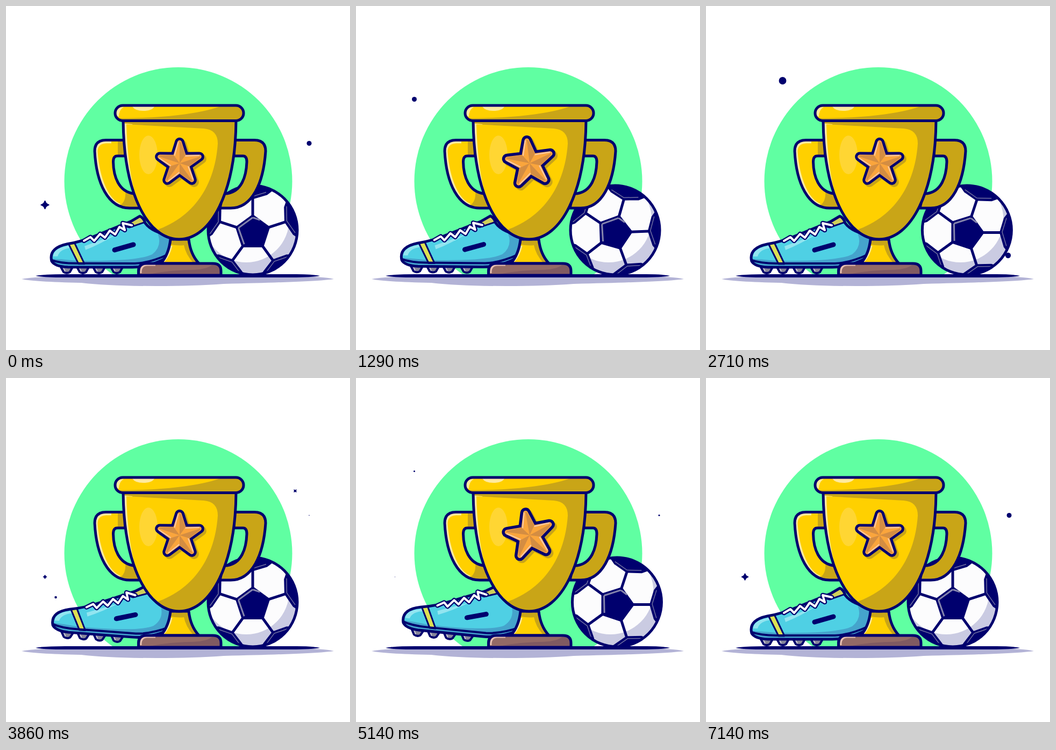
An HTML page that plays this animation: 640x640 px, repeating every 7.21 s.

```html
<!DOCTYPE html>
<html lang="en">
<head>
<meta charset="utf-8">
<title>Football trophy</title>
<style>
  html, body { margin: 0; width: 100%; height: 100%; overflow: hidden; background: #fff; }
  svg { display: block; width: 100vw; height: 100vh; }
  .line, .mid, .thin { stroke: #00006e; stroke-linejoin: round; stroke-linecap: round; }
  .line { stroke-width: 5; }
  .mid { stroke-width: 4; }
  .thin { stroke-width: 3; }
  .none { fill: none; }
  .navy { fill: #00006e; }
  .gold { fill: #ffd000; }
  .dark { fill: #c9a517; }
  .cream { fill: #ffeaa0; }
</style>
</head>
<body>
<svg viewBox="0 0 640 640">
  <defs>
    <path id="cup" d="M218 213C219 345 262 434 322 434S427 345 428 213Z"/>
    <path id="handleL" d="M222 249.500H186Q165 249.500 165 270C168 330 190 376 230 376H250L244 349H237C210 345 200 318 199.500 290Q199.500 279 207 279H222Z"/>
    <path id="handleR" d="M424 249.500H462Q483 249.500 483 270C479 330 458 376 418 376H398L404 349H411C438 345 447 318 448 290Q448 279 441 279H424Z"/>
    <path id="stem" d="M306 434Q303 462 288 479H359Q343 462 340 434Z"/>
    <path id="base" d="M246.500 501V493Q246.500 479 261 479H385Q400 479 400 493V501Z"/>
    <rect id="rim" x="203" y="185" width="239" height="28.500" rx="14.250"/>
    <path id="shoeBody" d="M85 475C80 456 95 447 114 443C132 440 150 435 168 427L232 401L249 391Q256 394 259 404Q272 422 312 428L300 468Q268 486 235 486H115Q91 485 85 475Z"/>
    <circle id="ballDisc" r="83"/>
    <clipPath id="inCup"><use href="#cup"/></clipPath>
    <clipPath id="inHandleL"><use href="#handleL"/></clipPath>
    <clipPath id="inStem"><use href="#stem"/></clipPath>
    <clipPath id="inBase"><use href="#base"/></clipPath>
    <clipPath id="inRim"><use href="#rim"/></clipPath>
    <clipPath id="inShoe"><use href="#shoeBody"/></clipPath>
    <clipPath id="inBall"><use href="#ballDisc"/></clipPath>
    <clipPath id="aboveGround"><path d="M0 0H640V501H0Z"/></clipPath>
  </defs>

  <circle cx="320.500" cy="326" r="212" fill="#60ffa2" clip-path="url(#aboveGround)"/>
  <path fill="#b3b3d6" d="M29 508Q60 503 110 503H530Q590 503 610 508Q580 513 405 517Q350 521 280 521Q190 521 140 515Q50 513 29 508Z"/>

  <g id="shoe">
    <g id="studs"></g>
    <use href="#shoeBody" fill="#4fd0e4"/>
    <g clip-path="url(#inShoe)">
      <path fill="#45a4cc" d="M268 400Q300 440 272 462Q245 476 130 474Q100 471 80 470V490H320V400Z"/>
      <path fill="#92e5f0" d="M88 466Q88 452 112 447L119 445L122 450Q100 452 96 466ZM146 447L205 425Q175 443 148 454Z"/>
      <path class="thin" fill="#dde052" d="M116 442L127 440L146 480H135Z"/>
      <path class="mid none" d="M82 472Q100 479 130 479H240Q268 478 302 462"/>
      <path class="thin" fill="#cfd05a" d="M216 409L250 391L259 402L230 412Z"/>
    </g>
    <use href="#shoeBody" class="line none"/>
    <g id="laces" class="none" stroke-linejoin="round" stroke-linecap="round"></g>
    <path class="none" stroke="#00006e" stroke-width="9" stroke-linecap="round" d="M202 454L237 444"/>
  </g>

  <g id="ball">
    <use href="#ballDisc" fill="#cacbe2"/>
    <g clip-path="url(#inBall)">
      <circle cx="-12" cy="-20" r="80" fill="#fcfcfd"/>
      <g id="patches"></g>
    </g>
    <use href="#ballDisc" class="line none"/>
  </g>

  <path class="navy" d="M55 502Q70 499 110 499H540Q570 499 584 502Q570 505 530 505H100Q70 505 55 502Z"/>

  <g id="trophy">
    <use href="#handleL" class="gold"/>
    <g clip-path="url(#inHandleL)">
      <path class="dark" d="M208 245H225V283H208ZM222 345Q224 366 208 374L255 380V340Z"/>
      <path class="none" stroke="#ffeaa0" stroke-width="5" d="M196 253H186Q168 254 168 271C172 325 190 362 212 370"/>
    </g>
    <use href="#handleL" class="line none"/>
    <use href="#handleR" class="line dark"/>

    <use href="#stem" class="gold"/>
    <g clip-path="url(#inStem)">
      <path class="dark" d="M300 430H345L365 480H350Q334 462 331 445Q318 447 300 442Z"/>
      <path class="none" stroke="#ffeaa0" stroke-width="3" d="M308 446Q304 464 294 475"/>
    </g>
    <use href="#stem" class="line none"/>

    <use href="#base" fill="#946a66"/>
    <g clip-path="url(#inBase)">
      <path fill="#805a62" d="M250 503Q290 492 345 491Q380 490 386 478H405V503Z"/>
      <path class="none" stroke="#e9c1b4" stroke-width="3" d="M251 497Q250 483 262 482H278"/>
    </g>
    <use href="#base" class="line none"/>

    <use href="#cup" class="dark"/>
    <g clip-path="url(#inCup)">
      <path class="cream" d="M216 218L235 220L285 426Q225 405 216 218Z"/>
      <path class="gold" d="M224 220L368 228Q394 230 394 256C389 330 352 396 270 420Q228 360 224 220Z"/>
      <ellipse cx="265" cy="277" rx="17" ry="36" fill="#ffd633"/>
    </g>
    <use href="#cup" class="line none"/>

    <use href="#rim" class="gold"/>
    <g clip-path="url(#inRim)">
      <path class="dark" d="M205 209Q270 209 320 203Q370 197 398 187H445V216H205Z"/>
      <path class="cream" d="M205 199Q205 188 219 188Q210 193 210 206Q205 205 205 199ZM235 187H276Q272 195 255 195Q240 195 235 187Z"/>
    </g>
    <use href="#rim" class="line none"/>
  </g>

  <g id="starShadow"></g>
  <g id="star"></g>
  <g id="sparkles" class="navy"></g>
</svg>

<script>
const LOOP = 7210, HALF = LOOP / 2, QUARTER = LOOP / 4;
const $ = id => document.getElementById(id);
const polar = (r, deg) => {
  const a = deg * Math.PI / 180;
  return [(r * Math.sin(a)).toFixed(2), (-r * Math.cos(a)).toFixed(2)];
};
const polygon = (points, attrs) => `<polygon points="${points.join(" ")}" ${attrs}/>`;
const arms = [0, 72, 144, 216, 288];

// Star: a sharp outline, rounded by thick strokes
const outline = arms.flatMap(a => [polar(38.7, a), polar(14.5, a + 36)]);
const rounded = (color, width) =>
  polygon(outline, `fill="${color}" stroke="${color}" stroke-width="${width}" stroke-linejoin="round"`);
$("starShadow").innerHTML = rounded("#c9a517", 18);
$("star").innerHTML = rounded("#00006e", 18) + rounded("#faa53c", 8) +
  arms.map(a =>
    polygon([[0, 0], polar(40.5, a), polar(39, a + 4), polar(19, a + 36)], 'fill="#d48d42"') +
    `<path d="M${polar(17.5, a - 32)}L${polar(39, a - 4)}" stroke="#fac9a8" stroke-width="2" stroke-linecap="round"/>`
  ).join("");

// Ball: a middle pentagon, five seams and five rim patches
const middle = arms.map(a => polar(31, a));
$("patches").innerHTML = '<g transform="translate(0 4.5)">' +
  polygon(middle, 'class="line navy"') +
  `<path class="none" stroke="#8585ac" stroke-width="3" stroke-linejoin="round" d="M${polar(27, 216)}L${polar(28, 288)}L${polar(28, 0)}L${polar(27, 30)}"/>` +
  arms.map(a =>
    `<path class="line" d="M${polar(31, a)}L${polar(64, a)}"/>` +
    `<g transform="rotate(${a})"><path class="navy" d="M-40 -80L-27 -70L0 -62L27 -70L40 -80L0 -105Z"/>` +
    `<path class="none" stroke="#7070a0" stroke-width="1.5" d="M-27 -75L-1 -67L25 -75"/></g>`
  ).join("") + "</g>";

$("studs").innerHTML = [113, 143, 173, 206].map(x =>
  `<path class="mid" fill="#85859a" d="M${x - 12} 484L${x - 6} 495Q${x} 499 ${x + 6} 495L${x + 12} 484Z"/>` +
  `<path stroke="#c5c5d2" stroke-width="2" d="M${x - 6} 488L${x - 3} 494"/>`).join("");

const lace = "M145 437L157 430L164 437L175 424L184 431L193 418L203 425L211 411L221 417L217 404L234 408";
$("laces").innerHTML =
  `<path stroke="#00006e" stroke-width="8.5" d="${lace}"/><path stroke="#fff" stroke-width="4" d="${lace}"/>`;

// Twinkles: x, y, radius, time of the peak, rotation (four-pointed when given)
const twinkles = [
  [72.5, 370, 8.5, 50, 0],
  [538, 210, 8.5, 470, 45],
  [564, 255.5, 4.6, 1772],
  [142.5, 139, 7, 884],
  [562, 464, 5.2, 884],
  [108.5, 173.5, 4.5, 1300],
  [92.5, 408, 4.5, 450],
];
$("sparkles").innerHTML = twinkles.map(([, , r, , turn]) => turn === undefined
  ? `<circle r="${r}"/>`
  : '<path stroke="#00006e" stroke-width="2.4" stroke-linejoin="round" d="M0 -7.2Q1.6 -1.6 7.2 0Q1.6 1.6 0 7.2Q-1.6 1.6 -7.2 0Q-1.6 -1.6 0 -7.2Z"/>'
).join("");
const twinkleNodes = [...$("sparkles").children];

const ease = (t, start, end) => {
  const u = Math.min(1, Math.max(0, (t - start) / (end - start)));
  return u * u * (3 - 2 * u);
};
const move = (id, value) => $(id).setAttribute("transform", value);

function draw(time) {
  const t = time % HALF;

  const roll = ease(t, 340, 1570) - ease(t, 2680, 3470);
  move("ball", `translate(${459 + 26.5 * roll} 417)`);
  move("patches", `rotate(${18.3 * roll})`);

  // Two toe taps, then a rest
  const tap = (t + 30) % HALF;
  const lift = tap < 2450 ? 4.8 * (1 - Math.cos(tap / 1225 * 2 * Math.PI)) : 0;
  move("shoe", `rotate(${lift} 287 495)`);

  const spin = 360 * ease(t, 825, 2545);
  const grow = 1 + 0.09 * (ease(t, 400, 800) - ease(t, 2400, 2700));
  const pose = `rotate(${spin}) scale(${grow})`;
  move("star", `translate(323 292.5) ${pose}`);
  move("starShadow", `translate(327 296.5) ${pose}`);

  twinkles.forEach(([x, y, , peak, turn = 0], i) => {
    const d = ((time - peak) % QUARTER + 1.5 * QUARTER) % QUARTER - QUARTER / 2;
    const size = Math.abs(d) < 390 ? Math.cos(Math.PI * d / 780) ** 2 : 0;
    twinkleNodes[i].setAttribute("transform", `translate(${x} ${y}) rotate(${turn}) scale(${size})`);
  });
}

const begin = performance.now();
function tick() {
  draw((performance.now() - begin) % LOOP);
  requestAnimationFrame(tick);
}
tick();
</script>
</body>
</html>
```
